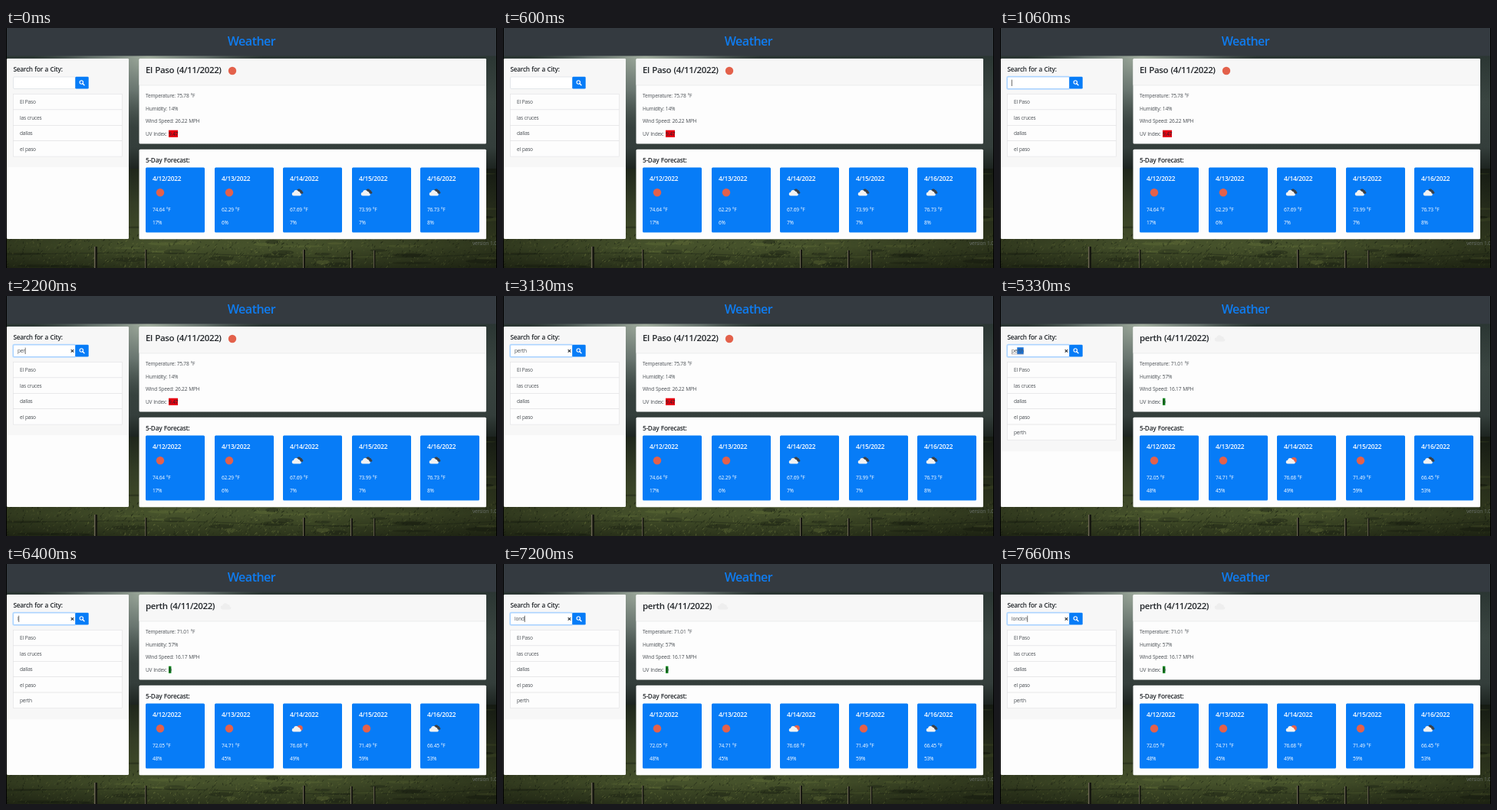
An HTML page that plays this animation: 640 px wide and 314 px high, repeating every 8000 ms.

```html
<!DOCTYPE html>
<html lang="en">
<head>
<meta charset="utf-8">
<title>Weather</title>
<style>
html, body { margin: 0; width: 100%; height: 100%; overflow: hidden; background: #000; }
svg { display: block; width: 100vw; height: 100vh; }
text { font: 400 6.6px "Open Sans", "Noto Sans", sans-serif; letter-spacing: -.033em; word-spacing: .07em; fill: #4a4f54; white-space: pre; }
.h { font-weight: 600; font-size: 8.3px; fill: #212529; }
.big { font-size: 11.5px; }
.brand { font-weight: 600; font-size: 16.1px; fill: #0f7cf0; }
.w, .w.h { fill: #fff; }
.line { fill: none; stroke: #e1e2e3; stroke-width: .6; }
</style>
</head>
<body>
<svg id="stage" viewBox="0 0 640 314" preserveAspectRatio="none">
  <defs>
    <linearGradient id="sky" x1="0" y1="0" x2="0" y2="1">
      <stop offset="0" stop-color="#2b3633"/>
      <stop offset=".4" stop-color="#3a4541"/>
      <stop offset=".8" stop-color="#343e3b"/>
      <stop offset="1" stop-color="#1b221e"/>
    </linearGradient>
    <radialGradient id="glow">
      <stop offset="0" stop-color="#a3afa0"/>
      <stop offset=".5" stop-color="#84918a" stop-opacity=".65"/>
      <stop offset="1" stop-color="#5a6662" stop-opacity="0"/>
    </radialGradient>
    <linearGradient id="field" x1="0" y1="0" x2="0" y2="1">
      <stop offset="0" stop-color="#20281c"/>
      <stop offset=".35" stop-color="#363f27"/>
      <stop offset=".78" stop-color="#46522b"/>
      <stop offset="1" stop-color="#2b331b"/>
    </linearGradient>
    <linearGradient id="shade">
      <stop offset="0" stop-color="#000" stop-opacity=".3"/>
      <stop offset=".3" stop-color="#000" stop-opacity="0"/>
      <stop offset=".6" stop-color="#000" stop-opacity="0"/>
      <stop offset="1" stop-color="#000" stop-opacity=".35"/>
    </linearGradient>
  </defs>
</svg>
<script>
const NS = "http://www.w3.org/2000/svg";
const stage = document.getElementById("stage");

function add(tag, attrs, parent = stage) {
  const el = document.createElementNS(NS, tag);
  for (const key in attrs) el.setAttribute(key, attrs[key]);
  return parent.appendChild(el);
}
const group = () => add("g", {});
const rect = (x, y, width, height, fill, parent, more) =>
  add("rect", { x, y, width, height, fill, ...more }, parent);
const circle = (cx, cy, r, fill, parent) => add("circle", { cx, cy, r, fill }, parent);
function label(x, y, str, cls = "", parent) {
  const el = add("text", { x, y, class: cls }, parent);
  el.textContent = str;
  return el;
}
const show = (el, on) => el.setAttribute("visibility", on ? "visible" : "hidden");

function seeded(seed) {
  return () => (seed = (seed * 16807) % 2147483647) / 2147483647;
}

// Stormy field behind the page
function drawBackdrop() {
  rect(0, 36, 640, 150, "url(#sky)");
  add("ellipse", { cx: 185, cy: 36, rx: 150, ry: 95, fill: "url(#glow)" });
  rect(0, 184, 640, 130, "url(#field)");
  const rnd = seeded(41);
  for (let i = 0; i < 70; i++) {
    add("ellipse", {
      cx: rnd() * 640, cy: 190 + rnd() * 124, rx: 8 + rnd() * 22, ry: 1 + rnd() * 2.2,
      fill: rnd() < .6 ? "#151b10" : "#66723a", opacity: .35
    });
  }
  const tints = ["#5a6636", "#181e11", "#6b763e", "#222a18", "#48552c"];
  for (const stroke of tints) {
    let d = "";
    for (let i = 0; i < 260; i++) {
      const x = rnd() * 640, y = 270 + rnd() * 44;
      d += `M${x.toFixed(1)} ${y.toFixed(1)}l${(rnd() * 4 - 1).toFixed(1)} ${(-1 - rnd() * 2).toFixed(1)}`;
    }
    add("path", { d, stroke, "stroke-width": 1, opacity: .6, fill: "none" });
  }
  rect(0, 184, 640, 130, "url(#shade)");
  add("path", { d: "M0 297Q180 291 320 298T640 295", stroke: "#151a12", "stroke-width": .6, opacity: .6, fill: "none" });
  const posts = [[115, 286, 4], [181, 290, 2.5], [387, 290, 3], [449, 291, 3], [479, 291, 2.5]];
  for (const [x, y, w] of posts) {
    rect(x, y, w, 314 - y, "#15160f");
    rect(x, y, w * .35, 314 - y, "#6b6653");
  }
  label(608, 284.3, "version 1.0").style.fill = "#686f69";
}

function sun(x, y, parent) {
  circle(x, y, 5.2, "#e3614b", parent);
}
function cloudPath(x, y, s, fill, parent) {
  add("path", {
    d: "M-5 4a3 3 0 0 1-.3-6a4.2 4.2 0 0 1 7.8-1.2a3.2 3.2 0 0 1 3 3.1a2.1 2.1 0 0 1-.3 4.1z",
    fill, transform: `translate(${x} ${y}) scale(${s})`
  }, parent);
}
function cloud(x, y, parent) {
  cloudPath(x + 2.6, y - 1.1, .68, "#3b4047", parent);
  cloudPath(x - .8, y + 1.1, .8, "#f2f2f2", parent);
}
function sunCloud(x, y, parent) {
  circle(x + 3, y - .4, 3.8, "#e3614b", parent);
  cloudPath(x - .8, y + 1.1, .8, "#f2f2f2", parent);
}

function drawCurrent(parent, name, values, uv, uvWidth, uvFill) {
  label(182, 59, `${name} (4/11/2022)`, "h big", parent);
  ["Temperature", "Humidity", "Wind Speed"].forEach((key, i) =>
    label(182, 91.1 + i * 16.6, `${key}: ${values[i]}`, "", parent));
  label(182, 141, "UV Index:", "", parent);
  rect(212, 133.7, uvWidth, 9.2, uvFill, parent);
  label(212.1, 141, uv, "", parent).style.fill = "#212529";
}

const cardX = i => Math.round(182 + i * 89.6);
function drawForecast(parent, temps, humidity, icons) {
  temps.forEach((temp, i) => {
    const x = cardX(i);
    icons[i](x + 19, 215.2, parent);
    label(x + 9, 239.6, `${temp} °F`, "w", parent);
    label(x + 9, 256.5, `${humidity[i]}%`, "w", parent);
  });
}

drawBackdrop();
rect(0, 0, 640, 36.5, "#343a40");
rect(0, 0, 1, 314, "#000");
rect(639, 0, 1, 314, "#000");
label(320, 23, "Weather", "brand").setAttribute("text-anchor", "middle");

// Search panel
rect(1, 40, 159, 236, "#fdfdfd", stage, { rx: 1.5 });
const panelHead = rect(1, 40, 159, 142, "#f7f7f7", stage, { rx: 1.5 });
label(9.5, 57, "Search for a City:", "h");
const ring = rect(8.3, 62.7, 83.4, 18, "#bfdeff", stage, { rx: 2.2 });
const field = rect(9.5, 64, 81, 15.5, "#fff", stage, { rx: 1.4, "stroke-width": .6 });
rect(90.3, 63.7, 17.4, 15.9, "#077cf7", stage, { rx: 1.4 });
add("circle", { cx: 98.3, cy: 71, r: 2.2, fill: "none", stroke: "#fff", "stroke-width": 1.1 });
add("path", { d: "M100 72.7L102 74.7", stroke: "#fff", "stroke-width": 1.4, "stroke-linecap": "round" });
const mark = rect(15, 67.2, 0, 9, "#1a73d8");
const typed = label(15, 74.4, "");
const underline = rect(15, 75.6, 0, .6, "#8d7a7a");
const caret = rect(15, 67.6, .7, 8.4, "#333");
const clear = add("path", { d: "M84.7 70.1l3.6 3.6m0-3.6l-3.6 3.6", stroke: "#2b3036", "stroke-width": 1.1 });

function drawItem(str, i) {
  const g = group(), y = 86.5 + i * 20.4;
  add("rect", { x: 9.5, y, width: 142, height: 20.4, class: "line", style: "fill:#fdfdfd" }, g);
  label(18, y + 12.8, str, "", g);
  return g;
}
const items = ["El Paso", "las cruces", "dallas", "el paso", "perth"].map(drawItem);

// Current weather and forecast panels
rect(173.5, 40, 452.5, 111.5, "#fdfdfd", stage, { rx: 1.5 });
rect(173.5, 40, 452.5, 35, "#f7f7f7", stage, { rx: 1.5 });
add("path", { d: "M173.5 75H626", class: "line" });
rect(173.5, 158.7, 452.5, 117.5, "#fdfdfd", stage, { rx: 1.5 });
label(182, 176, "5-Day Forecast:", "h");
for (let i = 0; i < 5; i++) {
  rect(cardX(i), 182.4, 77, 85, "#077cf7", stage, { rx: 1.5 });
  label(cardX(i) + 9, 199.5, `4/${12 + i}/2022`, "h w");
}

const nowA = group(), nowB = group(), nextA = group(), nextB = group();
drawCurrent(nowA, "El Paso", ["75.78 °F", "14%", "26.22 MPH"], "9.47", 12, "#e60011");
sun(295, 56, nowA);
drawCurrent(nowB, "perth", ["71.01 °F", "57%", "16.17 MPH"], "0", 3.4, "#08801a");
cloudPath(287, 56, .9, "#eeeeee", nowB);
drawForecast(nextA, ["74.64", "62.29", "67.69", "73.99", "76.73"], [17, 6, 7, 7, 8],
  [sun, sun, cloud, cloud, cloud]);
drawForecast(nextB, ["72.05", "74.71", "76.68", "71.49", "66.45"], [48, 45, 49, 59, 53],
  [sun, sun, sunCloud, sun, cloud]);

// Timeline in ms
const LOOP = 8000, BLINK = 530, FOCUS = 800;
const keys = [
  [0, ""], [2000, "p"], [2130, "pe"], [2200, "per"], [2460, "pert"], [2600, "perth"],
  [6400, "l"], [6600, "lo"], [6660, "lon"], [6800, "lond"], [7600, "londo"], [7660, "london"]
];
const blinkStarts = [FOCUS, ...keys.slice(1).map(k => k[0]), 3600, 5000].sort((a, b) => a - b);
const picks = [[5330, 3], [5400, 5]];
const lastBefore = (list, t) => list.filter(v => v <= t).pop();

function caretOn(t) {
  const start = lastBefore(blinkStarts, t);
  return start !== undefined && Math.floor((t - start) / BLINK) % 2 === 0;
}

function render(t) {
  const str = keys.filter(k => k[0] <= t).pop()[1];
  if (typed.textContent !== str) typed.textContent = str;
  const width = str ? typed.getComputedTextLength() : 0;

  const p = Math.min(1, Math.max(0, (t - FOCUS) / 150));
  const glow = p * p * (3 - 2 * p);
  ring.setAttribute("opacity", glow);
  const mix = (a, b) => Math.round(a + (b - a) * glow);
  field.setAttribute("stroke", `rgb(${mix(212, 128)},${mix(217, 189)},${mix(222, 255)})`);

  const pick = t < 6400 ? picks.filter(k => k[0] <= t).pop() : null;
  const from = pick && pick[1] < 5 ? typed.getSubStringLength(0, 5 - pick[1]) : 0;
  mark.setAttribute("x", 15 + from);
  mark.setAttribute("width", pick ? width - from : 0);
  typed.style.fill = pick && !from ? "#fff" : "";

  underline.setAttribute("width", width);
  show(underline, t >= 4060 && t < 6400);
  caret.setAttribute("x", 15 + width);
  show(caret, !pick && caretOn(t));
  show(clear, str);

  const listed = t >= 3600, current = t >= 3730, forecast = t >= 3800;
  show(items[4], listed);
  panelHead.setAttribute("height", listed ? 163.3 : 142);
  show(nowA, !current);
  show(nowB, current);
  show(nextA, !forecast);
  show(nextB, forecast);
}

const begin = performance.now();
function tick() {
  render((performance.now() - begin) % LOOP);
  requestAnimationFrame(tick);
}
tick();
</script>
</body>
</html>
```
